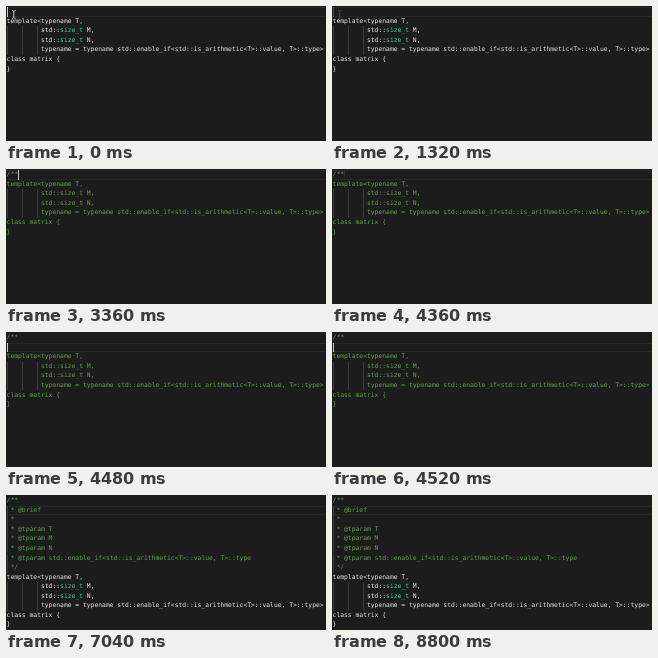
Recreate the animation shown at these times as an HTML page. Size 320x135 px, loop 8.84 s.

```html
<!DOCTYPE html>
<html lang="en">
<head>
<meta charset="utf-8">
<title>Doc comment expansion</title>
<style>
  html, body { margin: 0; width: 100%; height: 100%; overflow: hidden; background: #1c1c1c; }
  #stage { position: relative; width: 320px; height: 135px; overflow: hidden; }
  #stage div, #stage svg { position: absolute; }
  .line {
    left: .6px; height: 9.55px; white-space: pre; color: #e6e6e6;
    font: 6.35px/9.55px "DejaVu Sans Mono", "Liberation Mono", monospace;
    font-variant-ligatures: none; text-rendering: geometricPrecision;
  }
  .comment { color: #5fa54b; }
  .type { color: #4ec9a8; }
  .guide { width: .6px; height: 9.55px; background: #3c3c3c; }
  #current { left: 0; width: 320px; height: 9.55px; box-sizing: border-box; border: solid #272727; border-width: .7px 0; }
  #caret { width: 1.2px; height: 9.55px; background: #c4c5c3; }
</style>
</head>
<body>
<div id="stage">
  <div id="current"></div>
  <div id="text"></div>
  <div id="caret"></div>
  <svg id="pointer" width="12" height="14" style="left:0;top:0">
    <path d="M6 4.5 Q7.6 4.5 7.8 5.5 Q8 4.5 9.6 4.5 M7.8 5.5 V11.5 M6 12.3 Q7.6 12.3 7.8 11.5 Q8 12.3 9.6 12.3"
      fill="none" stroke="#d8d8d8" stroke-width=".9"/>
  </svg>
</div>
<script>
const LOOP = 8840, LEFT = 0.6, TOP = 1.2, ROW = 9.55, COL = 3.823;
const $ = id => document.getElementById(id);
const pad = ' '.repeat(9);
const trait = 'std::enable_if<std::is_arithmetic<T>::value, T>::type';
const code = [
  'template<typename T,',
  pad + 'std::size_t M,',
  pad + 'std::size_t N,',
  pad + 'typename = typename ' + trait + '>',
  'class matrix {',
  '}'
];
const doc = [
  '/**', ' * @brief ', ' *',
  ...['T', 'M', 'N', trait].map(name => ' * @tparam ' + name),
  ' */'
];

// at: start time, head: lines above the code, pos: caret row and column
const steps = [
  { at: 0, head: [''], pos: [0, 0] },
  { at: 2400, head: ['/'], pos: [0, 1] },
  { at: 2560, head: ['/*'], pos: [0, 2] },
  { at: 2640, head: ['/*'], pos: [0, 2], open: true },
  { at: 2960, head: ['/**'], pos: [0, 3], open: true },
  { at: 4400, head: ['/**', ''], pos: [1, 0], open: true },
  { at: 4560, head: doc, pos: [1, 10] }
];

function add(className, x, y) {
  const el = document.createElement('div');
  el.className = className;
  el.style.left = x + 'px';
  el.style.top = y + 'px';
  $('text').append(el);
  return el;
}

function addLine(text, row, comment) {
  const y = TOP + row * ROW;
  const indent = text.search(/\S/);
  for (let col = 0; col < indent; col += 4) add('guide', LEFT + col * COL, y);
  const el = add(comment ? 'line comment' : 'line', LEFT, y);
  const parts = comment ? [text] : text.split(/(size_t)/);
  for (const part of parts) {
    const span = document.createElement('span');
    span.textContent = part;
    if (part === 'size_t') span.className = 'type';
    el.append(span);
  }
}

function show({ head, pos: [row, col], open }) {
  $('text').replaceChildren();
  [...head, ...code].forEach((text, i) => addLine(text, i, open || i < head.length));
  const y = TOP + row * ROW + 'px';
  $('current').style.top = $('caret').style.top = y;
  $('caret').style.left = LEFT + col * COL + 'px';
}

function ramp(t, from, length) {
  const p = Math.min(1, Math.max(0, (t - from) / length));
  return p * p * (3 - 2 * p);
}

function caretOpacity(t) {
  if (t < 2400) return 1 - ramp(t, 1160, 240);
  if (t < 4400) return 1 - ramp(t, 4200, 200);
  if (t < 4820) return 1;
  const phase = (t - 4820) % 940;
  return 1 - ramp(phase, 0, 200) + ramp(phase, 500, 200);
}

let shown;
const start = performance.now();
function draw() {
  const t = (performance.now() - start) % LOOP;
  const step = steps.findLast(s => s.at <= t);
  if (step !== shown) show(shown = step);
  $('caret').style.opacity = caretOpacity(t);
  $('pointer').style.opacity = t < 2400 ? 1 - ramp(t, 1160, 240) : 0;
  requestAnimationFrame(draw);
}
draw();
</script>
</body>
</html>
```
